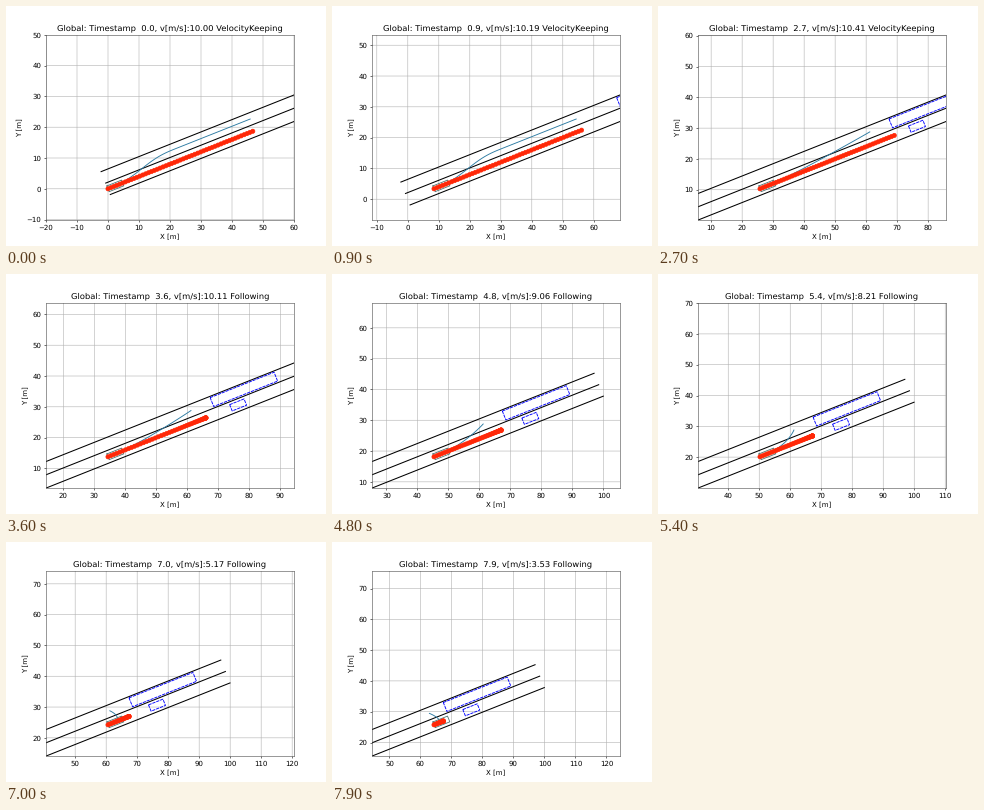
These frames come from a looping animation (320x240 px, 8000 ms). A matplotlib script:

```python
import numpy as np
import matplotlib.pyplot as plt
from matplotlib.animation import FuncAnimation
from matplotlib.ticker import MultipleLocator

plt.rcParams["text.hinting"] = "no_hinting"

N, DT = 80, 0.1
LANE = 4.0
BRAKE_AT = 2.7
FOLLOW_AT = 2.75       # main plan switches to following
LEFT_FOLLOW_AT = 1.75  # left-lane plan switches to following
LEFT_STOP = 67.5
HEADING = np.arctan(0.4)
U = np.array([np.cos(HEADING), np.sin(HEADING)])
NORMAL = np.array([-U[1], U[0]])


def speed_at(t):
    """Ease up to cruising speed, then brake along a quartic."""
    cruise = 10 + 0.42 * np.sin(np.pi / 6 * np.minimum(t, BRAKE_AT))
    b = np.maximum(t - BRAKE_AT, 0)
    return cruise - np.polyval([-0.01122, 0.08305, 0.08856, 0.19454, 0], b)


times = np.arange(N) * DT
speed = speed_at(times)
travel = np.concatenate([[0], np.cumsum((speed[1:] + speed[:-1]) / 2 * DT)])
travel = 1.004 * (travel + DT * (speed[0] - speed))


def smooth(u):
    return u ** 3 * (10 - 15 * u + 6 * u * u)


def stop_curve(u, length, v, duration):
    """Quintic that leaves at speed v and comes to rest at length."""
    return v * duration * (u - 6 * u**3 + 8 * u**4 - 3 * u**5) + length * smooth(u)


def world(s, d):
    """Road coordinates (along, left) to x, y."""
    return np.multiply.outer(U, s) + np.multiply.outer(NORMAL, d)


def box(s, d, length, width):
    along = s + length * np.array([0, 1, 1, 0, 0])
    across = d + width * np.array([0.5, 0.5, -0.5, -0.5, 0.5])
    return world(along, across)


def main_plan(t, s, v):
    if t < FOLLOW_AT:
        run = np.linspace(0, min(5.03 * v, 74.4 - s), 51)
    else:
        length = 72.6 - 1.5 * np.exp(3.6 - t) - s
        duration = min(5, 2 * length / v)
        u = np.linspace(0, 1, int(round(duration / DT)) + 1)
        run = stop_curve(u, length, v, duration)
    return world(s + run, 0 * run)


def left_plan(t, s, v):
    u = np.linspace(0, 1, 60)
    if t < LEFT_FOLLOW_AT:
        run = 51 * u
        d = LANE * smooth(np.minimum(run / 25, 1))
    else:
        run = stop_curve(u, max(LEFT_STOP - s, 0), v, 3.0)
        d = LANE * smooth(u)
    return world(s + run, d)


fig, ax = plt.subplots(figsize=(6.4, 4.8), dpi=50)
ax.grid(True, snap=False)
ax.set_xlabel("X [m]")
ax.set_ylabel("Y [m]")
ax.xaxis.set_major_locator(MultipleLocator(10))
ax.yaxis.set_major_locator(MultipleLocator(10))
ax.spines[:].set_color("#484848")

road = np.array([0, 99.2 / U[0]])
for offset in (-LANE / 2, LANE / 2, 1.5 * LANE):
    ax.plot(*world(road, np.full(2, offset)), "-k", lw=1.5)
for obstacle in ((74.8, 4.05, 22.2, 3.1), (79.8, 0.05, 5.0, 2.2)):
    ax.plot(*box(*obstacle), color="b", lw=1.3, ls=(0, (3.6, 1)))

left, = ax.plot([], [], color="#2c7aa2", lw=1.3)
car, = ax.plot([], [], color="#4f7472", lw=1.2)
# One size per dot keeps their centres off the pixel grid
plan = ax.scatter([], [], s=np.full(0, 36), color="#ff2808", lw=1, zorder=3)
title = ax.set_title("")


def update(i):
    t, s, v = times[i], travel[i], speed[i]
    x, y = world(s, 0.0)
    left.set_data(*left_plan(t, s, v))
    car.set_data(*box(s, 0, 5.1, 2.0))
    dots = main_plan(t, s, v).T
    plan.set_offsets(dots)
    plan.set_sizes(np.full(len(dots), 36))
    ax.set_xlim(x - 20, x + 60)
    ax.set_ylim(y - 10, y + 50)
    mode = "VelocityKeeping" if t < FOLLOW_AT else "Following"
    title.set_text(f"Global: Timestamp {t:4.1f}, v[m/s]:{v:.2f} {mode}")
    return left, car, plan, title


anim = FuncAnimation(fig, update, frames=N, interval=100, repeat=True,
                     repeat_delay=0, blit=False)
plt.show()
```
